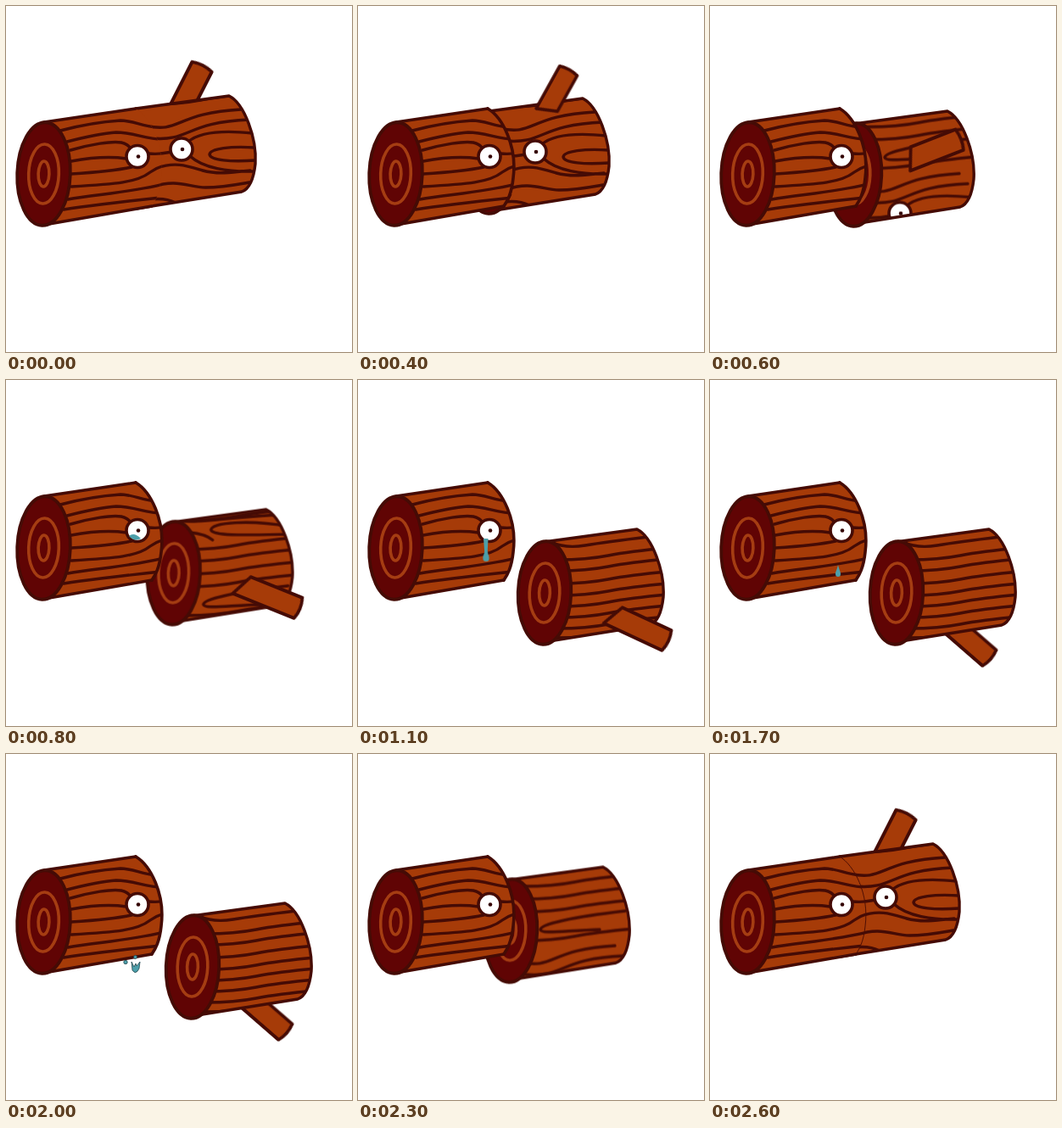
Animation, 408 px wide and 408 px high, one loop 2.7 s. Source, as an HTML page without scripts:

```html
<!DOCTYPE html>
<html lang="en">
<head>
<meta charset="utf-8">
<title>Splitting log</title>
<style>
  html, body { margin: 0; width: 100%; height: 100%; overflow: hidden; background: #fff; }
  svg { display: block; width: 100%; height: 100%; }

  .wood { fill: #a63b08; }
  .line { fill: none; stroke: #450b05; stroke-width: 3.4; stroke-linecap: round; stroke-linejoin: round; }
  .outlined { stroke: #450b05; stroke-width: 3.8; stroke-linejoin: round; }
  .tear { fill: #4c9faa; }

  /* Every pose holds for 100 ms, so all motion is stepped. */
  .half, .roll, .branch, .front, .back, .cut, .seam, .drop, .streak, .pool, .splash {
    animation: 2.7s step-end infinite;
  }
  .half { animation-name: slide; }
  .roll { animation-name: roll; }
  .branch { animation-name: swing; }
  .front { animation-name: front; }
  .back { animation-name: back; }
  .cut { animation-name: cut; }
  .seam { animation-name: seam; }
  .drop { animation-name: drop; }
  .streak { animation-name: streak; }
  .pool { animation-name: pool; }
  .splash { animation-name: splash; }

  @keyframes slide {
    0% { transform: translate(154px, 181px); }
    7.4% { transform: translate(154px, 181px); animation-timing-function: steps(2); }
    14.81% { transform: translate(156px, 184px); animation-timing-function: steps(2); }
    22.22% { transform: translate(171px, 199px); animation-timing-function: steps(3); }
    33.33% { transform: translate(211px, 242px); animation-timing-function: steps(2); }
    40.74% { transform: translate(220px, 251px); }
    77.77% { transform: translate(220px, 251px); animation-timing-function: steps(3); }
    88.88% { transform: translate(160px, 187px); }
    92.59% { transform: translate(155px, 182px); }
    96.29%, 100% { transform: translate(154px, 181px); }
  }
  @keyframes roll {
    0% { transform: translateY(0); }
    14.81% { transform: translateY(0); animation-timing-function: steps(4); }
    29.62% { transform: translateY(115px); animation-timing-function: steps(3); }
    40.74% { transform: translateY(230px); }
    77.77% { transform: translateY(230px); animation-timing-function: steps(3); }
    88.88%, 100% { transform: translateY(0); }
  }
  @keyframes swing {
    0% { transform: translate(78px, -111px) rotate(-63deg) scale(1, 1); }
    14.81% { transform: translate(93px, -109px) rotate(-61deg) scale(.83, -.9); }
    18.51% { transform: translate(113px, -84px) rotate(-43deg) scale(.9, 1); animation-timing-function: steps(3); }
    29.62% { transform: translate(149px, 42px) rotate(22deg) scale(1.13, 1); animation-timing-function: steps(3); }
    40.74% { transform: translate(146px, 57px) rotate(25deg) scale(1.1, 1); }
    44.44% { transform: translate(144px, 70px) rotate(30deg) scale(1, 1); animation-timing-function: steps(3); }
    55.55% { transform: translate(111px, 78px) rotate(41deg) scale(1, .95); }
    77.77% { transform: translate(111px, 78px) rotate(41deg) scale(1, .95); animation-timing-function: steps(3); }
    88.88%, 100% { transform: translate(78px, -111px) rotate(-63deg) scale(1, 1); }
  }
  @keyframes front {
    0%, 48.14%, 100% { visibility: hidden; }
    14.81% { visibility: visible; }
  }
  @keyframes back {
    0%, 48.14%, 100% { visibility: visible; }
    14.81% { visibility: hidden; }
  }
  /* While the halves still touch, only the lower rim of the cut shows. */
  @keyframes cut {
    0%, 92.59%, 100% { visibility: hidden; clip-path: inset(80% -3px -3px); }
    14.81%, 88.88% { visibility: visible; clip-path: inset(80% -3px -3px); }
    18.51% { visibility: visible; clip-path: none; }
  }
  @keyframes seam {
    0%, 100% { stroke-width: 0; }
    3.7% { stroke-width: .8px; }
    11.11% { stroke-width: 2px; }
    14.81% { stroke-width: 3.6px; }
    92.59% { stroke-width: 2px; }
    96.29% { stroke-width: .9px; }
  }
  @keyframes drop {
    0% { transform: translate(151px, 187px); visibility: hidden; }
    33.33% { transform: translate(151px, 194px) scale(1); visibility: visible; animation-timing-function: steps(2); }
    40.74% { transform: translate(151px, 208px) scale(1.2); visibility: visible; animation-timing-function: steps(4); }
    55.55% { transform: translate(151px, 213px) scale(.95); visibility: visible; }
    59.25% { transform: translate(151px, 218px) scale(1); visibility: visible; animation-timing-function: steps(3); }
    70.37% { transform: translate(151px, 245px) scale(1); visibility: visible; }
    74.07%, 100% { transform: translate(151px, 245px); visibility: hidden; }
  }
  @keyframes streak {
    0%, 100% { transform: translate(151px, 187px) scale(1, 0); }
    29.62% { transform: translate(151px, 187px) scale(1, 0); animation-timing-function: steps(3); }
    40.74% { transform: translate(151px, 187px) scale(1, 1); animation-timing-function: steps(4); }
    55.55% { transform: translate(151px, 187px) scale(.5, 1.2); }
    59.25% { transform: translate(151px, 196px) scale(.4, .9); }
    62.96% { transform: translate(151px, 210px) scale(.4, 0); }
  }
  @keyframes pool {
    0%, 40.74%, 100% { visibility: hidden; }
    29.62% { visibility: visible; }
  }
  @keyframes splash {
    0%, 81.48%, 100% { visibility: hidden; transform: none; }
    74.07% { visibility: visible; transform: none; }
    77.77% { visibility: visible; transform: translateY(3px); }
  }
</style>
</head>
<body>
<svg viewBox="0 0 408 408" xmlns="http://www.w3.org/2000/svg">
  <defs>
    <g id="face">
      <ellipse rx="31.3" ry="60.8" fill="#600404" class="outlined" transform="rotate(2)"/>
      <g fill="none" stroke="#a53d12" stroke-width="3.6" transform="rotate(2)">
        <ellipse rx="17.8" ry="35"/>
        <ellipse rx="6.4" ry="15"/>
      </g>
    </g>
    <g id="eye">
      <circle r="13" fill="#fff" stroke="#450b05" stroke-width="3.6"/>
      <circle cx="1" r="2.3" fill="#300"/>
    </g>
    <path id="branch" class="wood outlined" vector-effect="non-scaling-stroke"
      d="M-60 -13 L-2 -13 Q2 0 -2 13 L-71 13 Z"/>
    <path id="grain" d="M15 2 q35 0 60 -5 t70 -9"/>
    <path id="rightBody" d="M-1 -60 L109 -75 C127 -66 142 -25 140 5 C138 24 132 35 124 38 L-1 58 Z"/>
    <path id="leftBody" d="M45 137 L153 121 C170 131 188 165 183 203 C181 222 176 230 172 236 L45 258 Z"/>
    <clipPath id="rightClip"><use href="#rightBody"/></clipPath>
    <clipPath id="leftClip"><use href="#leftBody"/></clipPath>
  </defs>

  <g class="half">
    <g class="back"><use href="#branch" class="branch"/></g>
    <use href="#rightBody" class="wood"/>
    <g clip-path="url(#rightClip)">
      <g class="roll">
        <g transform="translate(-154 -181)">
          <path class="line" d="M165 141 C205 151 200 126 277 122 M172 156 C217 160 212 137 287 134
            M215 160 C230 147 262 147 291 150
            M294 167 C265 165 241 168 240 175 C241 182 265 184 294 182
            M165 174 Q180 175 196 172
            M217 177 C232 191 262 196 293 195
            M178 191 C200 183 215 189 232 194 C250 199 270 196 288 194
            M174 213 C200 204 215 213 235 214 C255 214 270 211 287 208
            M165 229 C180 226 190 227 200 232"/>
          <use href="#eye" x="207" y="169"/>
        </g>
        <g class="line" transform="translate(0 -115)">
          <path d="M136 -55 C90 -63 45 -60 44 -51 C46 -43 90 -45 142 -46
            M5 -62 C30 -58 60 -66 130 -69 M18 -48 Q38 -46 46 -39
            M135 15 C75 22 36 30 35 37 C36 43 65 38 105 37"/>
          <use href="#grain" y="-30"/>
          <use href="#grain" y="-16"/>
          <use href="#grain" y="-1"/>
          <use href="#grain" y="14"/>
          <use href="#grain" y="48"/>
        </g>
        <g class="line" transform="translate(0 -230)">
          <path d="M8 -60 Q24 -52 48 -56 T122 -66"/>
          <use href="#grain" y="-41"/>
          <use href="#grain" y="-28"/>
          <use href="#grain" y="-13"/>
          <use href="#grain" y="1"/>
          <use href="#grain" y="14"/>
          <use href="#grain" y="27"/>
          <use href="#grain" y="40"/>
          <use href="#grain" y="51"/>
        </g>
      </g>
    </g>
    <use href="#rightBody" class="line"/>
    <use href="#face" class="cut"/>
    <g class="front"><use href="#branch" class="branch"/></g>
  </g>

  <use href="#leftBody" class="wood"/>
  <g clip-path="url(#leftClip)">
    <path class="line" d="M64 147 C90 140 120 136 135 135 C150 135 160 142 178 143
      M72 160 C95 154 115 150 130 149 C150 149 165 157 184 157
      M76 170 C100 163 125 159 136 161 Q144 163 147 168
      M77 183 Q115 176 142 180
      M77 198 Q125 195 148 190
      M77 213 C130 210 155 208 170 196 Q178 190 188 188
      M73 228 C110 222 150 219 186 210
      M68 240 C100 235 145 230 182 226
      M168 174 Q180 175 190 173"/>
  </g>
  <path class="line" d="M45 137 L153 121 M172 236 L45 258"/>
  <path class="line seam" d="M153 121 C170 131 188 165 183 203 C181 222 176 230 172 236"/>
  <use href="#face" x="44.5" y="198"/>
  <use href="#eye" x="155" y="177.5"/>

  <g class="tear">
    <path class="pool" d="M145 184 Q151 179 159 187 Q151 191 145 184 Z"/>
    <path class="streak" d="M-3 0 H2.5 L1.5 20 H-1.5 Z"/>
    <path class="drop" d="M0 -9 C1 -4 3.5 0 3 2 A3 3 0 0 1 -3 2 C-3.5 0 -1 -4 0 -9 Z"/>
    <g class="splash" stroke="#24474d" stroke-width=".8">
      <circle cx="141" cy="245.5" r="2.2"/>
      <circle cx="152.5" cy="239.5" r="2"/>
      <path d="M148 245 L151 251 L153 247 L154 250 L158 245 L157 253 Q153 261 149 255 Z"/>
    </g>
  </g>
</svg>
</body>
</html>
```
